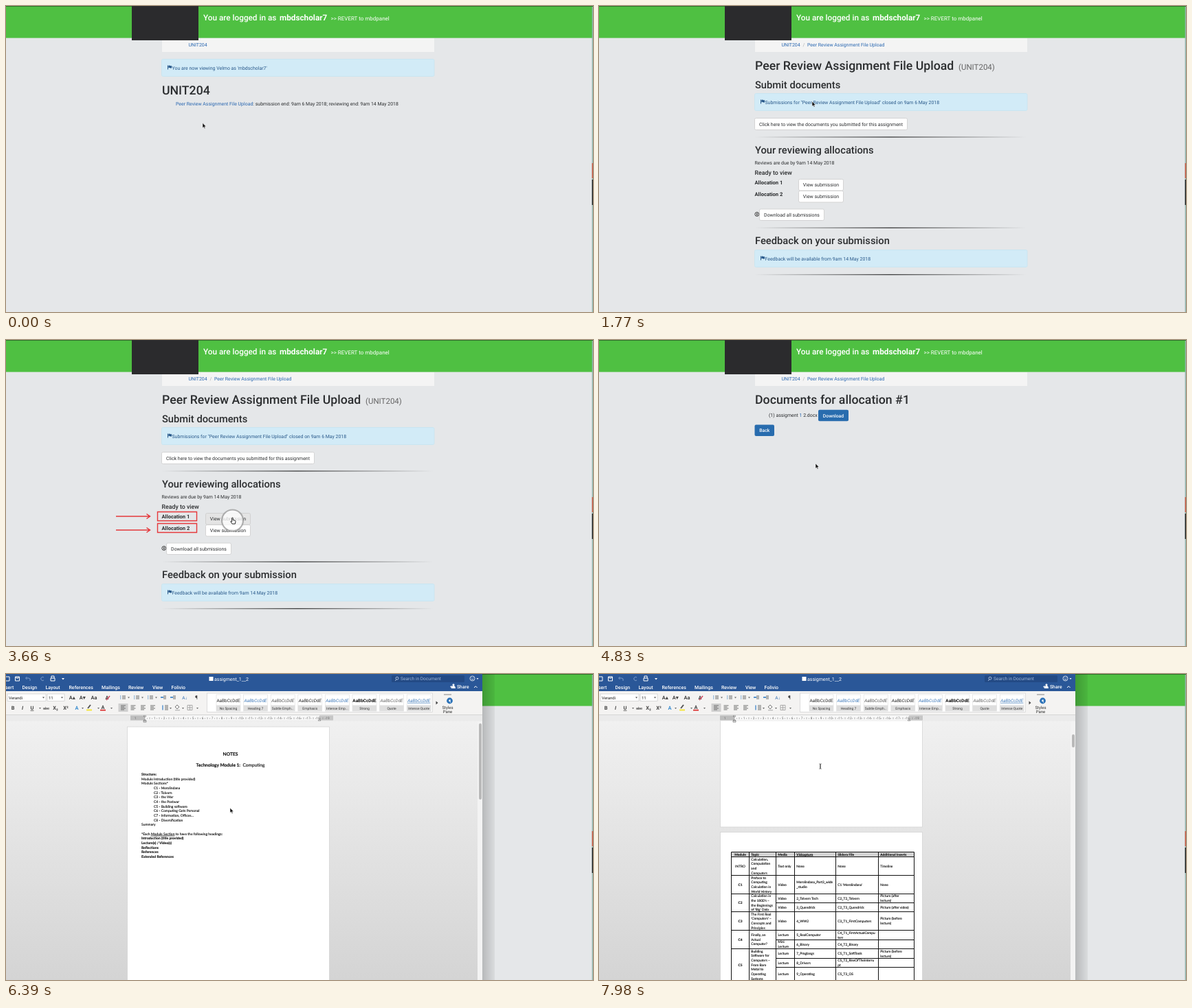
Recreate the animation shown at these times as an HTML page. Size 854 by 446 pixels, loop 8000 ms.

```html
<!DOCTYPE html>
<html lang="en">
<head>
<meta charset="utf-8">
<title>Peer review walkthrough</title>
<style>
html, body { margin: 0; width: 100%; height: 100%; overflow: hidden; background: #e5e7e9; }
svg { display: block; width: 100vw; height: 100vh; font-family: Roboto, sans-serif; text-rendering: geometricPrecision; }
text { white-space: pre; }
.doc { font-family: Lato, sans-serif; }
.doc text { stroke: #111; stroke-width: .14; }
</style>
</head>
<body>
<svg id="stage" viewBox="0 0 854 446"></svg>
<script>
const LINK = '#2866b0', INK = '#2b2d2f', RIBBON_INK = '#444';
const USER = 'mbdscholar7', COURSE = 'UNIT204', TASK = 'Peer Review Assignment File Upload';

// Markup helpers
const rect = (x, y, w, h, fill, attrs = '') =>
  `<rect x="${x}" y="${y}" width="${w}" height="${h}" fill="${fill}" ${attrs}/>`;
const path = (d, stroke, width = 1, attrs = '') =>
  `<path d="${d}" fill="none" stroke="${stroke}" stroke-width="${width}" ${attrs}/>`;
const text = (x, y, size, str, fill = INK, attrs = '') =>
  `<text x="${x}" y="${y}" font-size="${size}" fill="${fill}" ${attrs}>${str}</text>`;
const group = (id, body, attrs = '') => `<g id="${id}" ${attrs}>${body}</g>`;
const MID = 'text-anchor="middle" ', BOLD = 'font-weight="700" ', MEDIUM = 'font-weight="500" ';

// Web page parts
const body = (x, y, str, fill = INK) => text(x, y, 6.95, str, fill);
const h1 = (y, str) => text(227, y, 17.7, str, INK, MEDIUM);
const h2 = (y, str) => text(227, y, 14.7, str, INK, MEDIUM);
const rule = y => rect(226, y - .6, 396, 1.3, 'url(#rule)');
const alertBox = (y, str) =>
  rect(226.5, y + .5, 396.5, 25, '#d2ebf7', 'rx="2" stroke="#c6e5f2" stroke-width=".8"') +
  `<path d="M235 ${y + 9.5}h1v6h-1zM236.4 ${y + 10}q1.5 -.8 2.5 0t2.2 0v3.3q-1.3 .7 -2.3 0t-2.4 0z" fill="#28588a"/>` +
  body(241.5, y + 15.5, str, '#28588a');
const button = (x, y, w, h, str, attrs = '') =>
  rect(x + .5, y + .5, w - 1, h - 1, '#fff', `rx="2" stroke="#ccc" stroke-width=".8" ${attrs}`) +
  text(x + w / 2, y + h / 2 + 2.5, 6.95, str, INK, MID);
const primary = (x, y, w, str) =>
  rect(x, y, w, 16.5, '#286cae', 'rx="2"') + text(x + w / 2, y + 10.7, 6.8, str, '#fff', MID + MEDIUM);
const crumbs = withTask =>
  body(265.5, 58.5, COURSE, LINK) +
  (withTask ? body(296.5, 58.5, '/', '#aaa') + body(303, 58.5, TASK, LINK) : '');

const chrome = () =>
  rect(0, 0, 854, 446, '#e5e7e9') + rect(227, 47, 396, 20, '#f4f4f4') +
  rect(0, 0, 853, 46.6, '#4fc042') + rect(0, 0, 854, 1, '#2f702b') +
  rect(183, -47, 97, 97, '#2b2b2d') +
  text(287, 21.3, 11.75, 'You are logged in as', '#fff', MEDIUM) +
  text(398, 21.3, 11.75, USER, '#fff', BOLD) +
  text(472.5, 21.3, 8, '&gt;&gt; REVERT to mbdpanel', '#fff');

const coursePage = () => crumbs(false) +
  alertBox(77, `You are now viewing Velmo as '${USER}'`) + h1(128.5, COURSE) +
  body(247, 144.5, `<tspan fill="${LINK}">${TASK}</tspan>: submission end: 9am 6 May 2018; reviewing end: 9am 14 May 2018`);

const marker = y => path(`M220.5 ${y - 6.5}h57v13h-57z`, '#e5383b', 1.4);
const arrow = y => path(`M160 ${y}h49M204.5 ${y - 3.5}l5 3.5l-5 3.5`, '#e5383b', 1.5);

const taskPage = () => crumbs(true) +
  h1(92.5, TASK) + text(523, 92.5, 11.5, `(${COURSE})`, '#666') +
  h2(119.8, 'Submit documents') +
  alertBox(127, `Submissions for "${TASK}" closed on 9am 6 May 2018`) +
  button(226, 163, 223, 18, 'Click here to view the documents you submitted for this assignment') +
  rule(191) + h2(215.2, 'Your reviewing allocations') +
  body(226.5, 230.5, 'Reviews are due by 9am 14 May 2018') +
  text(226.5, 245.7, 8.8, 'Ready to view', INK, MEDIUM) +
  text(226.5, 259.7, 7.6, 'Allocation 1', INK, BOLD) +
  text(226.5, 276.7, 7.6, 'Allocation 2', INK, BOLD) +
  button(290, 252, 66, 17.5, 'View submission', 'id="viewButton"') +
  button(290, 269, 66, 17.5, 'View submission') +
  '<circle cx="229.8" cy="303.5" r="2.9" fill="none" stroke="#333"/>' + rect(229.2, 301.8, 1.3, 3.4, '#333') +
  button(233, 295.5, 95, 17.5, 'Download all submissions') +
  rule(323.3) + h2(347.3, 'Feedback on your submission') +
  alertBox(355, 'Feedback will be available from 9am 14 May 2018') + rule(391.5) +
  group('notes', marker(257) + marker(274) + arrow(257) + arrow(277));

const filesPage = () => crumbs(true) + h1(92.5, 'Documents for allocation #1') +
  body(247, 112.3, `(1) assigment <tspan fill="${LINK}">1</tspan> 2.docx`) +
  primary(319, 101.8, 44, 'Download') + primary(226.5, 123.5, 28.5, 'Back');

// Word processor: document
const LINE = 6.67;
const docLine = (x, row, str, attrs = '') => text(x, 148 + row * LINE, 5, str, '#111', attrs);

const COLS = [192.5, 218.5, 257.5, 284.5, 344.5, 406.5, 458.5];
const cell = (col, yMid, str, centred, attrs = '') => {
  const lines = str.split('|');
  const x = centred ? (COLS[col] + COLS[col + 1]) / 2 : COLS[col] + 2.8;
  return lines.map((line, i) => text(x, yMid + 1.8 + (i - (lines.length - 1) / 2) * LINE, 4.85, line, '#111',
    (centred ? MID : '') + attrs)).join('');
};
const MODULES = [
  ['INTRO', 'Calculation,|Computation|and|Computers', [27, 'Text only', 'None', 'None', 'Timeline']],
  ['C1', 'Preface to|Computing|Calculation in|World History',
    [27, 'Video', 'Merolindana_Part3_wide|_studio', "C1 'Merolindana'", 'None']],
  ['C2', "Calculation in|the 1800's –|the Beginnings|of 'Big' Data",
    [13, 'Video', '2_Tolvern Tech', 'C2_T2_Tolvern', 'Picture (after|lecture)'],
    [13, 'Video', '3_Quendrick', 'C2_T3_Quendrick', 'Picture (after video)']],
  ['C3', "The First Real|'Computers' –|Concepts and|Principles",
    [27, 'Video', '4_WW2', 'C3_T1_FirstComputers', 'Picture (before|lecture)']],
  ['C4', 'Finally, an|Actual|Computer?',
    [14, 'Lecture', '5_RealComputer', 'C4_T1_FirstActualCompu|ters', ''],
    [13, 'Mini|Lecture', '6_Binary', 'C4_T2_Binary', '']],
  ['C5', 'Building|Software for|Computers –|From Bare|Metal to|Operating|Systems',
    [14, 'Lecture', '7_Proglangs', 'C5_T1_SoftTools', 'Picture (before|lecture)'],
    [13, 'Lecture', '8_Drivers', 'C5_T2_RiseOfTheInterru|pt', ''],
    [20, 'Lecture', '9_Operating', 'C5_T3_OS', '']],
];
const table = top => {
  let y = top + 7;
  let out = rect(192.5, top, 266, 7, '#d2d2d2');
  let lines = `M192.5 ${top}h266M192.5 ${y}h266`;
  ['Module', 'Topic', 'Media', 'Vidcapturo', 'Slidora File', 'Additional Inserts'].forEach((name, i) => {
    out += cell(i, top + 3.5, name, i === 0, BOLD + (i === 3 ? 'text-decoration="underline #d33"' : ''));
  });
  for (const [code, topic, ...rows] of MODULES) {
    const height = rows.reduce((sum, row) => sum + row[0], 0);
    out += cell(0, y + height / 2, code, true, code === 'INTRO' ? '' : BOLD) + cell(1, y + height / 2, topic);
    rows.forEach(([h, ...cells], i) => {
      cells.forEach((str, c) => { out += cell(c + 2, y + h / 2, str); });
      y += h;
      lines += i < rows.length - 1 ? `M257.5 ${y}H458.5` : `M192.5 ${y}H458.5`;
    });
  }
  for (const x of COLS) lines += `M${x} ${top}V${y}`;
  return out + path(lines, '#111');
};

const documentPages = () => {
  const sheet = (y, h) => rect(176.5, y, 294, h, '#fff', 'stroke="#d0d0d0" stroke-width=".7"');
  const chapters = ['Merolindana', 'Tolvern', 'the War', 'the Postwar', 'Building software',
    'Computing Gets Personal', 'Information, Offices...', 'Diversification'];
  return sheet(77, 416) + sheet(500.5, 420) +
    text(326.5, 119.3, 6.7, 'NOTES', '#111', MID + BOLD) +
    text(326.5, 134.7, 6.6, `<tspan ${BOLD}>Technology Module 1:</tspan>  Computing`, '#111', MID) +
    docLine(197, 0, 'Structure:', BOLD) +
    docLine(197, 1, 'Module Introduction (title provided)') +
    docLine(197, 2, 'Module Sections*') +
    chapters.map((name, i) => docLine(215, i + 3, `C${i + 1} - ${name}`)).join('') +
    docLine(197, 11, 'Summary') +
    docLine(197, 13, '*Each <tspan text-decoration="underline">Module Section</tspan> to have the following headings:') +
    ['Introduction (title provided)', 'Lecture(s) / Video(s)', 'Reflections', 'References', 'Extended References']
      .map((name, i) => docLine(197, i + 14, name, BOLD)).join('') +
    table(529.5);
};

// Word processor: title bar, ribbon, ruler
const bars = (x, y, widths, color = '#666') =>
  path(widths.map((w, i) => `M${x} ${y + i * 2}h${w}`).join(''), color, .9);
const titleBar = () => {
  const tabs = [[-1, 'sert'], [23.5, 'Design'], [57.5, 'Layout'], [91.5, 'References'], [139, 'Mailings'],
    [178, 'Review'], [213, 'View'], [240.5, 'Folivio']];
  return rect(0, 0, 693, 25, '#2a5798') +
    path('M0 4h5v6h-5M13.5 4h6v6h-6zM15 4v2h3v-2M65 6h6v4h-6zM66 6v-3h4v3', '#fff', 1) +
    path('M29 6h4q3 0 2 4M30.5 4l-2 2l2 2M55 5a2.6 2.6 0 1 0 0 4', '#7b9bc9', 1) +
    '<path d="M81 6h4l-2 2.5z" fill="#fff"/>' +
    rect(295.5, 4, 6, 6, '#fff') + text(303, 9.7, 7, 'assigment_1__2', '#fff') +
    rect(561, 2, 106, 10, '#234a85', 'rx="1.5"') +
    path('M568 8l-2 2M571 6.2a2 2 0 1 1 -4 0a2 2 0 1 1 4 0', '#b5c8e4', .9) +
    text(574, 9.2, 6.6, 'Search in Document', '#9fb6d8') +
    path('M682 6.5a3.5 3.5 0 1 1 -7 0a3.5 3.5 0 1 1 7 0M677 7.5q1.5 1.6 3 0M677.3 5.3v.8M679.7 5.3v.8', '#fff', .8) +
    '<path d="M684.5 6h3l-1.5 2z" fill="#fff"/>' +
    tabs.map(([x, name]) => text(x, 21.5, 7, name, '#fff', MEDIUM)).join('') +
    text(646, 21.3, 7, '+', '#fff', BOLD) + '<path d="M650 17a1.5 1.5 0 1 1 2 0q2 1 2 4h-6q0 -3 2 -4z" fill="#fff"/>' +
    text(656, 21.3, 6.8, 'Share', '#fff', MEDIUM) + path('M681 20l2.3 -2.3l2.3 2.3', '#fff', 1);
};
const fontControls = () => {
  const glyph = (x, y, str, color = RIBBON_INK, attrs = '') => text(x, y, 7.4, str, color, MID + BOLD + attrs);
  const field = (x, w, str) => rect(x, 29, w, 10.5, '#fff', 'stroke="#ccc" stroke-width=".7"') +
    text(x + 2, 36.8, 6, str, '#222') + `<path d="M${x + w - 5} 33.5h3l-1.5 2z" fill="#444"/>`;
  return field(2, 56, 'Verandi') + field(60, 25, '11') +
    glyph(96, 37, 'A▴') + glyph(111, 37, 'A▾') + glyph(128, 37, 'Aa') + glyph(147, 37, 'A') +
    path('M146 38l5 -6', '#d1485f', 1.5) +
    glyph(10, 52, 'B') + glyph(24, 52, 'I', RIBBON_INK, 'font-style="italic"') +
    glyph(38, 52, 'U', RIBBON_INK, 'text-decoration="underline"') +
    text(58.5, 51.5, 5.6, 'abc', RIBBON_INK, MID + 'text-decoration="line-through"') +
    glyph(72, 52, 'X₂') + glyph(87, 52, 'X²') + glyph(103, 52, 'A', '#3a8ccf') +
    path('M119 50l4 -5', '#555', 2) + rect(117, 51.5, 8, 2, '#f5e53b') +
    glyph(141, 51, 'A') + rect(137, 51.8, 8, 1.8, '#d33') +
    [48, 110, 133, 152].map(x => `<path d="M${x} 49h3l-1.5 2z" fill="#666"/>`).join('');
};
const paragraphControls = () =>
  [166, 186, 206].map(x => bars(x + 3, 32, [5, 5, 5]) + bars(x, 32, [1.3, 1.3, 1.3], '#3a80c0') +
    `<path d="M${x + 11} 33.5h3l-1.5 2z" fill="#666"/>`).join('') +
  [225, 239].map(x => bars(x + 4, 32, [4, 4, 4]) + path(`M${x} 34h4`, '#2f7cc4', 1.6)).join('') +
  text(260, 37, 6.5, 'A↓', '#2f6cb0', MID) + text(277, 37.3, 8, '¶', RIBBON_INK, MID) +
  rect(163.5, 43, 14, 12, '#cfcfcf') +
  [167, 181.5, 196, 210].map(x => bars(x, 46, [7, 5, 7, 5])).join('') +
  bars(231, 46, [5, 5, 5, 5]) + path('M228 45.5v7', '#2f7cc4', 1.2) +
  path('M246 48l3 -3l3 3l-3 3z', '#777') + rect(246, 52, 7, 1.4, '#bbb') +
  path('M264 45.5h7v7h-7zM264 49h7M267.5 45.5v7', '#999', .8) +
  [238, 256, 277].map(x => `<path d="M${x} 49h3l-1.5 2z" fill="#666"/>`).join('');
const styleGallery = () => {
  const italic = 'font-style="italic" ', blue = '#3d78b8';
  const styles = [['No Spacing', '#222', ''], ['Heading 7', blue, italic], ['Subtle Emph...', '#555', italic],
    ['Emphasis', '#222', italic], ['Intense Emp...', blue, italic], ['Strong', '#111', BOLD],
    ['Quote', '#666', italic], ['Intense Quote', blue, italic + 'text-decoration="underline"']];
  return rect(292.5, 28, 328, 27.5, '#fff', 'stroke="#d0d0d0" stroke-width=".7"') +
    styles.map(([name, color, attrs], i) => {
      const x = 323.5 + i * 39.6;
      return rect(x - 17.5, 30, 35, 24, '#fff', 'stroke="#ddd" stroke-width=".6"') +
        rect(x - 17.5, 45.5, 35, 8.5, '#dedede') +
        text(x, 40.9, 6.4, 'AaBbCcDdE', color, MID + attrs) + text(x, 51.6, 5, name, '#333', MID);
    }).join('') +
    '<path d="M625.5 39.5l3 2.5l-3 2.5z" fill="#444"/>' + path('M637 30h11', '#bbb', 2) +
    '<circle cx="645.5" cy="39" r="4.4" fill="#2c72b8"/>' + text(645.5, 41.5, 6.5, '¶', '#fff', MID) +
    text(642.5, 51, 6, 'Styles', '#333', MID) + text(642.5, 57, 6, 'Pane', '#333', MID);
};
const ruler = () => {
  let ticks = '', numbers = '';
  for (let i = 1; i <= 19; i++) {
    const x = 202 + i * 14;
    ticks += `M${x - 7} 63v3M${x - 3.5} 64v1.5M${x - 10.5} 64v1.5`;
    numbers += text(x, 66.3, 4.8, i, '#666', MID);
  }
  return rect(181, 60.5, 21, 7, '#bdbdbd') + rect(202, 60.5, 254, 7, '#f8f8f8') + rect(456, 60.5, 20, 7, '#c6c6c6') +
    text(188, 66.3, 4.8, 1, '#666', MID) + path(ticks, '#888', .6) + numbers +
    path('M200 61h4l-2 2.5zM200 68h4l-2 -2.5zM200 68.2h4v2h-4zM454 68h4l-2 -2.5z', '#777', .7);
};
const wordWindow = () =>
  rect(693, 0, 18, 446, 'url(#shadow)') + rect(0, 60, 693, 386, 'url(#desk)') +
  group('pages', documentPages(), 'class="doc"') +
  rect(686, 69, 7, 377, '#f3f3f3') + rect(688, 72, 4, 111, '#b9b9b9', 'id="thumb" rx="2"') +
  rect(0, 25, 693, 35, '#f4f3f2') + rect(0, 59.5, 693, 9, '#ebebeb') + path('M0 59.5H693', '#d0d0d0', .8) +
  titleBar() + fontControls() + paragraphControls() + styleGallery() + group('ruler', ruler());

const gradient = (id, vertical, stops) =>
  `<linearGradient id="${id}" x2="${vertical ? 0 : 1}" y2="${vertical ? 1 : 0}">` +
  stops.map(([o, c, a = 1]) => `<stop offset="${o}" stop-color="${c}" stop-opacity="${a}"/>`).join('') + '</linearGradient>';

const stage = document.getElementById('stage');
stage.innerHTML = '<defs>' +
  gradient('rule', false, [[0, '#000', 0], [.5, '#000', .75], [1, '#000', 0]]) +
  gradient('shadow', false, [[0, '#000', .2], [1, '#000', .05]]) +
  gradient('desk', true, [[0, '#f1f1f1'], [1, '#d4d4d4']]) + '</defs>' +
  chrome() + group('course', coursePage()) + group('task', taskPage()) + group('files', filesPage()) +
  group('word', wordWindow()) +
  rect(852.6, 1, 1.4, 445, '#8fb3ab') + rect(852.6, 229, 1.4, 22, '#c8553d') + rect(852.6, 253, 1.4, 37, '#1c1c1c') +
  group('pointer',
    group('ring', '<circle cy="4" r="15.5" fill="#fff" fill-opacity=".75" stroke="#999" stroke-width="2.2" stroke-opacity=".75"/>') +
    group('arrow', '<path d="M0 0v7.2l1.7 -1.5l1.1 2.6l1.2 -.5l-1.1 -2.5h2.2z" fill="#111" stroke="#fff" stroke-width=".5"/>') +
    group('hand', '<path d="M-.8 .3q.8 -1 1.5 0v3l3 .8q1 .4 .8 1.6l-.7 3.3h-4.2l-2.3 -3.4q0 -1.2 1.9 .2z" fill="#fff" stroke="#111" stroke-width=".9"/>') +
    group('beam', path('M-1.5 -3.7q1.5 0 1.5 1v5.4q0 1 1.5 1M1.5 -3.7q-1.5 0 -1.5 1v5.4q0 1 -1.5 1', '#333', .8)));

// Timeline: keys are [ms, ...values]
const LOOP = 8000;
const SCENES = [['course', 0, 1350], ['task', 1350, 4100], ['files', 4100, 5800], ['word', 5800, LOOP]];
const POINTER = [[0, 286, 170.5], [300, 286, 170.5], [900, 310, 139], [1900, 310, 139], [3200, 329.5, 259],
  [4200, 329.5, 259], [4830, 315, 180], [5250, 339, 108], [5800, 339, 108], [6250, 326, 195],
  [7110, 326, 197], [LOOP, 322, 134.5]];
const SCROLL = [[6700, 0], [7110, 87], [7980, 270]];
const THUMB = [[6700, 72, 111], [7110, 81, 31], [7980, 88, 19]];
const RING = [[1150, 0], [1200, 1], [1300, 1], [1350, 0], [3500, 0], [3560, 1], [3800, 1], [3900, 0],
  [5450, 0], [5500, 1], [5650, 1], [5700, 0]];
const NOTES = [[2500, 0], [2700, 1]];

const smooth = u => u * u * (3 - 2 * u);
function sample(keys, t, ease = u => u) {
  const next = keys.findIndex(key => key[0] > t);
  if (next === 0) return keys[0].slice(1);
  if (next < 0) return keys[keys.length - 1].slice(1);
  const a = keys[next - 1], b = keys[next];
  const u = ease((t - a[0]) / (b[0] - a[0]));
  return a.slice(1).map((v, i) => v + (b[i + 1] - v) * u);
}

const el = id => document.getElementById(id);
const show = (id, on) => el(id).setAttribute('visibility', on ? 'visible' : 'hidden');
const within = (t, from, to) => t >= from && t < to;
const move = (id, x, y) => el(id).setAttribute('transform', `translate(${x} ${y})`);

function draw() {
  const t = performance.now() % LOOP;
  for (const [id, from, to] of SCENES) el(id).style.display = within(t, from, to) ? '' : 'none';

  const overView = within(t, 3150, 4100);
  const hand = within(t, 850, 1350) || overView || within(t, 5200, 5800);
  const beam = t >= 6700;
  show('hand', hand);
  show('beam', beam);
  show('arrow', !hand && !beam);
  move('pointer', ...sample(POINTER, t, smooth));
  el('ring').setAttribute('opacity', sample(RING, t)[0]);
  el('notes').setAttribute('opacity', sample(NOTES, t)[0]);
  el('viewButton').setAttribute('fill', overView ? '#e4e4e4' : '#fff');

  // Whole-pixel scrolling keeps the table rules crisp
  move('pages', 0, -Math.round(sample(SCROLL, t)[0]));
  move('ruler', beam ? -5 : 0, 0);
  const [top, height] = sample(THUMB, t);
  el('thumb').setAttribute('y', top);
  el('thumb').setAttribute('height', height);
  requestAnimationFrame(draw);
}
draw();
</script>
</body>
</html>
```
